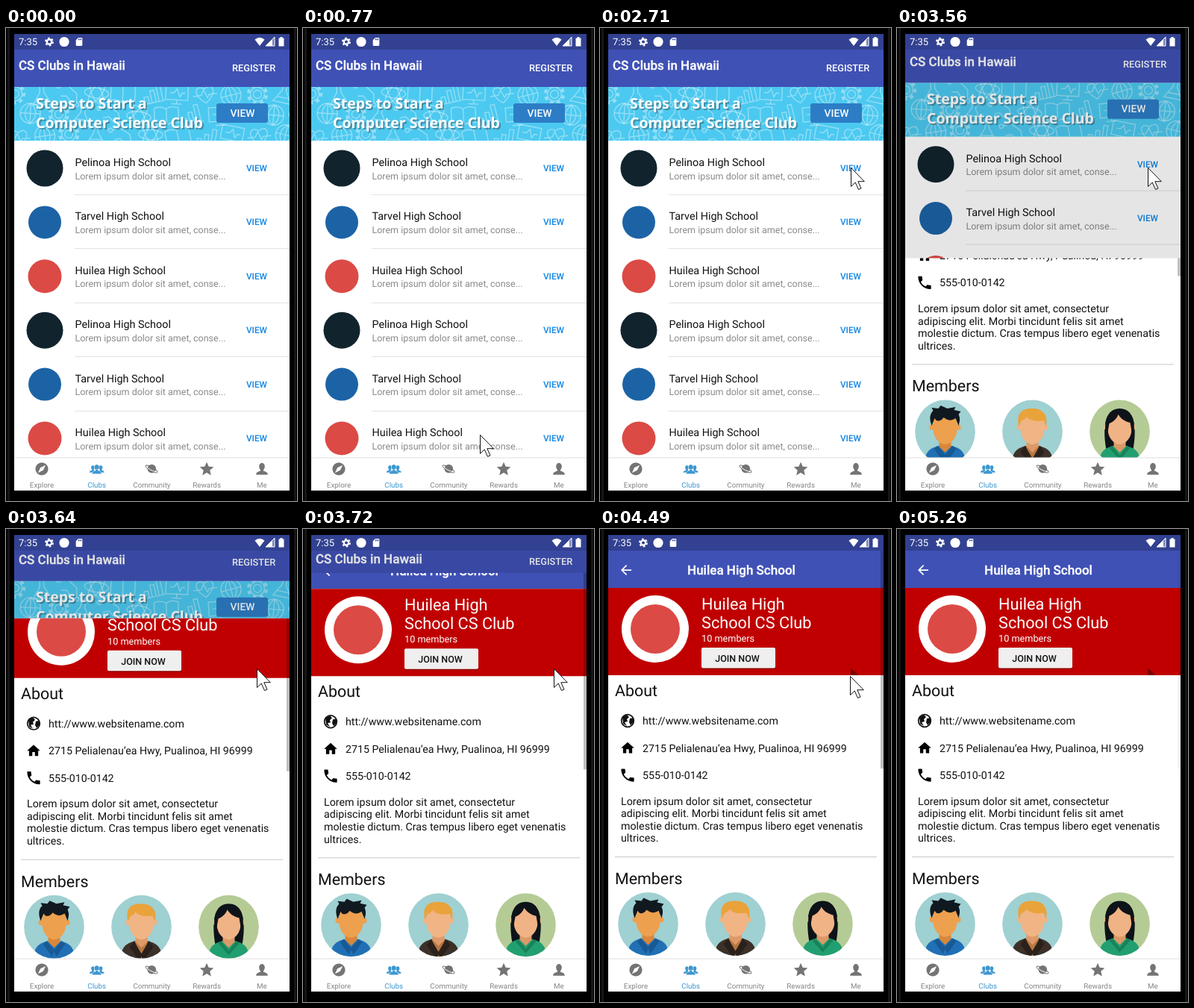
An HTML page for the animation above (5.42 s loop, 390 by 634 pixels).

```html
<!DOCTYPE html>
<html lang="en">
<head>
<meta charset="utf-8">
<title>Club app</title>
<style>
  html, body { margin: 0; width: 100%; height: 100%; overflow: hidden; background: #000; }
  svg { display: block; position: absolute; left: 0; top: 0; }
  text { font-family: Roboto, sans-serif; text-rendering: geometricPrecision; white-space: pre; }
</style>
</head>
<body>
<svg id="stage" width="390" height="634" viewBox="0 0 390 634"></svg>
<script>
const LOOP = 5420, TOP = 29, HEIGHT = 547;
const BLUE = '#3f51b5', LINK = '#0f85e6', GREY = '#747474';

// ---- drawing helpers ----
const text = (x, y, size, str, fill = '#111', extra = '') =>
  `<text x="${x}" y="${y}" font-size="${size}" fill="${fill}" ${extra}>${str}</text>`;
const rect = (x, y, w, h, fill, extra = '') =>
  `<rect x="${x}" y="${y}" width="${w}" height="${h}" fill="${fill}" ${extra}/>`;
const disc = (x, y, r, fill, extra = '') =>
  `<circle cx="${x}" cy="${y}" r="${r}" fill="${fill}" ${extra}/>`;
const path = (d, fill, extra = '') => `<path d="${d}" fill="${fill}" ${extra}/>`;
const group = (x, y, body, extra = '') => `<g transform="translate(${x} ${y})" ${extra}>${body}</g>`;
// icon on a 24 unit grid, centred on x, y
const icon = (d, x, y, size, fill) =>
  `<path transform="translate(${x - size / 2} ${y - size / 2}) scale(${size / 24})" d="${d}" fill="${fill}"/>`;
const MID = 'text-anchor="middle"', MEDIUM = 'font-weight="500"', BOTH = MID + ' ' + MEDIUM;
const TITLE = MEDIUM + ' stroke="#fff" stroke-width=".3"';

const ICONS = {
  back: 'M20 11H7.83l5.59-5.59L12 4l-8 8 8 8 1.41-1.41L7.83 13H20z',
  home: 'M10 20v-6h4v6h5v-8h3L12 3 2 12h3v8z',
  phone: 'M6.62 10.79c1.44 2.83 3.76 5.14 6.59 6.59l2.2-2.2c.27-.27.67-.36 1.02-.24 1.12.37 2.33.57 3.57.57.55 0 1 .45 1 1V20c0 .55-.45 1-1 1-9.39 0-17-7.61-17-17 0-.55.45-1 1-1h3.5c.55 0 1 .45 1 1 0 1.25.2 2.45.57 3.57.11.35.03.74-.25 1.02z',
  card: 'M18 2h-8L4 8v12c0 1.1.9 2 2 2h12c1.1 0 2-.9 2-2V4c0-1.1-.9-2-2-2zm-6 6h-2V4h2zm3 0h-2V4h2zm3 0h-2V4h2z',
  compass: 'M12 2C6.48 2 2 6.48 2 12s4.48 10 10 10 10-4.48 10-10S17.52 2 12 2zm2.19 12.19L6 18l3.81-8.19L18 6z',
  star: 'M12 17.27 18.18 21l-1.64-7.03L22 9.24l-7.19-.61L12 2 9.19 8.63 2 9.24l5.46 4.73L5.82 21z'
};

function statusBar() {
  const gear = disc(58, 18.5, 3.2, 'none', 'stroke="#fff" stroke-width="2.4"') +
    disc(58, 18.5, 5, 'none', 'stroke="#fff" stroke-width="2" stroke-dasharray="2.6 2.636"');
  return rect(11, 8, 369, 21, '#324191') + text(17, 23, 13, '7:35', '#fff') + gear +
    disc(78, 18.5, 6.6, '#fff') + icon(ICONS.card, 98, 18.5, 13, '#fff') +
    path('M333.5 15.5Q340 10 346.5 15.5L340 24z', '#fff') +
    path('M360 12V24H348z', '#fff', 'fill-opacity=".35"') + path('M357 15V24H348z', '#fff') +
    path('M360 12V24H348z', 'none', 'stroke="#fff"') +
    path('M365.5 13.5h2v-1.5h3v1.5h2v11h-7z', '#fff');
}

// ---- banner with line doodles ----
function doodles() {
  const shapes = [
    '<circle r="4"/><circle r="7"/><circle r="9" stroke-width="3" stroke-dasharray="3.5 3.57"/>',
    '<path d="M0 9C-14-1-8-11 0-5C8-11 14-1 0 9zM-12 1H-4L-1-4L2 4L4 1H12"/>',
    '<path d="M-11 9H11M-9 9V2H-5V9M-2 9V-3H2V9M5 9V-9H9V9"/>',
    '<ellipse rx="12" ry="5"/><ellipse rx="12" ry="5" transform="rotate(60)"/><ellipse rx="12" ry="5" transform="rotate(120)"/>',
    '<path d="M-3-10H3M-2-10V-3L-9 9H9L2-3V-10M-6 4H6"/>',
    '<circle r="10"/><path d="M-10 0H10M0-10V10M0-10C-7-4-7 4 0 10C7 4 7-4 0-10"/>',
    '<rect x="-11" y="-9" width="22" height="14"/><path d="M-5 9H5M0 5V9M-7-2H-3L0-6L3 2L5-2H8"/>',
    '<path d="M0-7C-5-10-10-9-12-8V7C-7 6-3 7 0 9C3 7 7 6 12 7V-8C8-9 4-10 0-7V9"/>',
    '<path d="M-10-8H-2L6 0V9M-10 2H-4L0 8"/><circle cx="6" cy="11" r="2"/><circle cx="-12" cy="-8" r="2"/>'
  ];
  let seed = 11, out = '';
  const rnd = () => (seed = seed * 16807 % 2147483647) / 2147483647;
  for (let row = 0; row < 3; row++) for (let col = 0; col < 11; col++) {
    const x = 12 + col * 36 + (row % 2) * 18 + rnd() * 5, y = 86 + row * 28 + rnd() * 5;
    const shape = shapes[(col * 4 + row * 5) % shapes.length];
    out += `<g transform="translate(${x} ${y}) rotate(${rnd() * 30 - 15}) scale(1.35)">${shape}</g>`;
  }
  return `<g fill="none" stroke="#fff" stroke-opacity=".4" clip-path="url(#banner)">${out}</g>`;
}

function banner() {
  const lines = (dx, fill, op) => ['Steps to Start a', 'Computer Science Club'].map((s, i) =>
    text(40 + dx, 107.5 + dx + i * 26, 19.5, s, fill,
      `font-weight="700" fill-opacity="${op}" style="font-family:'Open Sans',sans-serif"`)).join('');
  return rect(11, 79, 369, 72, '#4cc9f0') + doodles() +
    lines(2, '#35525e', .5) + lines(0, '#fff', 1) +
    rect(282, 101, 69, 26, '#2d7dc6', 'rx="3"') +
    text(317, 118.5, 13.8, 'VIEW', '#fff', BOTH);
}

function listPage() {
  const clubs = [['Pelinoa', '#11242e', 24.5], ['Tarvel', '#1c63a6', 22], ['Huilea', '#dc4a45', 22.5]];
  let rows = '';
  for (let i = 0; i < 6; i++) {
    const [name, color, r] = clubs[i % 3], y = 151 + i * 72.4;
    rows += disc(52, y + 37, r, color) +
      text(92.5, y + 34, 14.4, name + ' High School') +
      text(92.5, y + 51.5, 12.5, 'Lorem ipsum dolor sit amet, conse...', '#8a8a8a') +
      text(336, y + 41, 11.8, 'VIEW', LINK, BOTH) +
      rect(92, Math.round(y + 72), 288, 1, '#e2e2e2');
  }
  return rect(11, TOP, 369, 590, '#fff') + rect(11, 0, 369, 79, BLUE) +
    text(17, 56, 17, 'CS Clubs in Hawaii', '#fff', TITLE) +
    text(303, 58, 12.8, 'REGISTER', '#fff', MEDIUM) + banner() + rows;
}

// ---- members ----
function avatar(x, bg, body) {
  return group(x, 529.5, `<g clip-path="url(#oval)">${rect(-41, -43, 82, 86, bg)}${body}</g>`);
}
const torso = color => path('M-28 45C-27 27-22 23-9 19H9C22 23 27 27 28 45z', color);
const head = (skin, neck) => path('M-8 8H8V20L0 28L-8 20z', neck) +
  disc(-17, -6, 4, skin) + disc(17, -6, 4, skin) +
  path('M-16-24H16V-4C16 8 8 17 0 17C-8 17-16 8-16-4z', skin);

function members() {
  const one = torso('#2170b5') + path('M-10 19L0 31L10 19L15 23L3 40L0 33L-3 40L-15 23z', '#185a96') +
    head('#eda04e', '#d9873a') +
    path('M-18-8C-22-18-20-25-16-28L-18-32L-9-31L-6-35L3-31L14-33L12-29L21-27L18-23C21-17 19-12 18-8L14-18C7-13 2-16-2-19C-6-13-12-13-14-18z', '#101920');
  const two = torso('#3c3028') + path('M-9 19L0 45L9 19z', '#b9773f') +
    path('M-10 19L-16 27L-3 45L0 40L3 45L16 27L10 19L0 36z', '#2a211c') + head('#f1b484', '#dd9a68') +
    path('M-18-7C-22-22-16-31-2-31C14-32 22-22 18-7L15-15C6-13-4-15-8-20C-10-16-14-15-15-14z', '#e9a33a');
  const three = path('M-18 24C-22 2-23-31 0-31C23-31 22 2 18 24L20 31H-20z', '#0d1318') +
    torso('#229f70') + path('M-10 19L0 32L10 19L14 22L0 38L-14 22z', '#18825a') +
    head('#f0b386', '#dc9968') + path('M-18 12C-22-14-18-30 0-30C18-30 22-14 18 12L14-12C6-14 1-18-2-23C-4-17-9-13-14-11z', '#0d1318');
  return avatar(64.5, '#9fd0d2', one) + avatar(181.5, '#9fd0d2', two) + avatar(298.5, '#b5cb96', three);
}

function detailPage() {
  const globe = disc(37, 257, 8.3, '#fff', 'stroke="#111" stroke-width="1.7"') +
    path('M30 252L36 249L39 252L36 255L37 258L33 259L36 264L31 261zM40 254L45 253V259L41 263L39 259z', '#111');
  const lorem = ['Lorem ipsum dolor sit amet, consectetur', 'adipiscing elit. Morbi tincidunt felis sit amet',
    'molestie dictum. Cras tempus libero eget venenatis', 'ultrices.'];
  return rect(11, 0, 369, 640, '#fff') + rect(11, 0, 369, 79, BLUE) +
    icon(ICONS.back, 35, 55, 21, '#fff') + text(189.5, 61, 17, 'Huilea High School', '#fff', MID + ' ' + TITLE) +
    rect(11, 79, 369, 117, '#c00000') + disc(74, 134, 45, '#fff') + disc(74, 134, 33, '#dc4a45') +
    text(136, 108, 21.7, 'Huilea High', '#fff') + text(136, 132.5, 21.7, 'School CS Club', '#fff') +
    text(136, 151, 12.7, '10 members', '#fff') +
    rect(136, 160, 99, 28, '#700000', 'rx="2" fill-opacity=".6"') + rect(136, 159, 99, 27.5, '#efefef', 'rx="2"') +
    text(184, 178, 12.5, 'JOIN NOW', '#111', BOTH) +
    text(20, 224, 21.4, 'About') + globe + icon(ICONS.home, 37, 293.5, 21, '#000') + icon(ICONS.phone, 37, 330, 23, '#000') +
    text(57, 262, 14.2, 'htt://www.websitename.com') +
    text(57, 298.5, 14.2, '2715 Pelialenau‘ea Hwy, Pualinoa, HI 96999') +
    text(57, 335, 14.2, '555-010-0142') +
    lorem.map((s, i) => text(28, 369.5 + i * 16.6, 14.25, s)).join('') +
    rect(20, 439, 351, 1, '#c8c8c8') + text(20, 476, 21.4, 'Members') + members() +
    '<rect id="bar" x="376" y="29" width="4" height="292"/>';
}

function tabBar() {
  const bust = (x, y, s, fill, extra = '') => `<g transform="translate(${x} ${y}) scale(${s})" fill="${fill}" ${extra}>` +
    '<ellipse cy="-3.5" rx="4.2" ry="5.2"/><path d="M-2.2 0H2.2V3C6 4 8.5 5 8.5 8.5H-8.5C-8.5 5-6 4-2.2 3z"/></g>';
  const on = '#3c97d0';
  const ring = (color, width) => `<ellipse cx="195" cy="591" rx="9" ry="2.2" transform="rotate(30 195 591)" ` +
    `fill="none" stroke="${color}" stroke-width="${width}"/>`;
  const planet = ring(GREY, 1.1) + disc(195.3, 590.7, 5.8, GREY) +
    path('M188 587.5Q193 593.5 202 595', 'none', 'stroke="#fff"');
  const labels = ['Explore', 'Clubs', 'Community', 'Rewards', 'Me'];
  return rect(11, 576, 369, 44, '#fff') + rect(11, 575.5, 369, 1, '#dedede') +
    icon(ICONS.compass, 48, 591, 20.5, GREY) +
    bust(116.5, 591, .55, on) + bust(127, 591, .55, on) +
    bust(121.7, 591.4, .72, on, 'stroke="#fff" stroke-width="1.4" paint-order="stroke"') +
    planet + icon(ICONS.star, 269, 591, 22.5, GREY) + bust(343, 591, .92, GREY) +
    labels.map((s, i) => text(48 + i * 73.7, 616, 9.8, s, i === 1 ? on : '#858585', MID)).join('');
}

const stage = document.getElementById('stage');
stage.innerHTML = `<defs>
  <clipPath id="screen">${rect(11, TOP, 369, HEIGHT, '#000')}</clipPath>
  <clipPath id="reveal"><rect id="window" x="11" y="29" width="369" height="${HEIGHT}"/></clipPath>
  <clipPath id="banner">${rect(11, 79, 369, 72, '#000')}</clipPath>
  <clipPath id="oval"><ellipse rx="40.3" ry="42.5"/></clipPath></defs>` +
  rect(0, 0, 390, 634, '#000') + rect(2, 0, 3, 634, '#161616') + rect(386, 0, 3, 634, '#161616') +
  `<g clip-path="url(#screen)"><g id="list">${listPage()}</g>` +
  `<rect id="shade" x="11" y="29" width="369" height="${HEIGHT}"/>` +
  `<g id="card" clip-path="url(#reveal)"><g id="detail">${detailPage()}</g></g></g>` +
  statusBar() + tabBar() +
  path('M336 186.5L347 196H336z', '#7d0000', 'id="trace"') +
  `<g id="ring" fill="none">${disc(336, 187, 11, 'none', 'stroke="#000"')}${disc(336, 187, 10, 'none', 'stroke="#fff"')}</g>` +
  path('M.5.5V25.5L6.2 20L10.5 29.5L14 28L9.8 18.7H18.3z', '#fff', 'id="cursor" stroke="#111"');

// ---- motion ----
const el = id => document.getElementById(id);
const [list, shade, card, detail, reveal, bar, trace, ring, cursor] =
  ['list', 'shade', 'card', 'detail', 'window', 'bar', 'trace', 'ring', 'cursor'].map(el);

// pointer legs: start time, last time, then x, y pairs every 80 ms
const legs = [
  [150, 690, 301, 602, 296, 580, 287, 558, 276, 538, 264, 523, 252, 526, 243, 536, 239, 543],
  [770, 770, 237, 545],
  [1070, 1610, 236, 536, 239, 500, 250, 445, 266, 385, 284, 330, 302, 282, 314, 257, 315, 251],
  [1690, 2070, 319, 240, 325, 226, 331, 212, 334, 200, 336, 192, 336, 189],
  [2240, 2240, 336, 187],
  [4490, 4870, 335, 197, 312, 296, 319, 420, 343, 530, 371, 603, 400, 660]
];
const stepAt = (t, from, to) => t >= to ? Math.ceil((to - from) / 80) : Math.floor((t - from) / 80);

function pointer(t) {
  const leg = legs.filter(l => t >= l[0]).pop();
  if (!leg) return [400, 660];
  const i = 2 + 2 * stepAt(t, leg[0], leg[1]);
  return [leg[i], leg[i + 1]];
}

// cubic-bezier(.208, .82, .25, 1)
function ease(x) {
  if (x >= 1) return 1;
  const curve = (s, a, b) => 3 * (1 - s) ** 2 * s * a + 3 * (1 - s) * s * s * b + s ** 3;
  let lo = 0, hi = 1;
  for (let i = 0; i < 24; i++) {
    const m = (lo + hi) / 2;
    if (curve(m, .208, .25) < x) lo = m; else hi = m;
  }
  return curve(lo, .82, 1);
}

function slide(t) {
  if (t < 3560) return 0;
  const now = Math.min(3950, 3560 + 80 * stepAt(t, 3560, 3950));
  return ease((now - 3503) / 425);
}

const show = (node, on) => node.setAttribute('visibility', on ? 'visible' : 'hidden');
const move = (node, x, y) => node.setAttribute('transform', `translate(${x} ${y})`);

function draw(t) {
  const p = slide(t), [x, y] = pointer(t);
  move(list, 0, -.02 * HEIGHT * p);
  shade.setAttribute('fill-opacity', Math.min(p / .36, 1) * .1);
  card.setAttribute('display', p > 0 ? 'inline' : 'none');
  reveal.setAttribute('y', TOP + HEIGHT * (1 - p));
  move(detail, 0, .041 * HEIGHT * (1 - p));
  bar.setAttribute('fill-opacity', t < 5040 ? .25 : t < 5190 ? .23 : t < 5260 ? .13 : .04);
  show(trace, t >= 4490);
  show(ring, t >= 2540 && t < 2710);
  move(cursor, x, y);
}

const start = performance.now();
function tick() {
  draw((performance.now() - start) % LOOP);
  requestAnimationFrame(tick);
}
tick();
</script>
</body>
</html>
```
